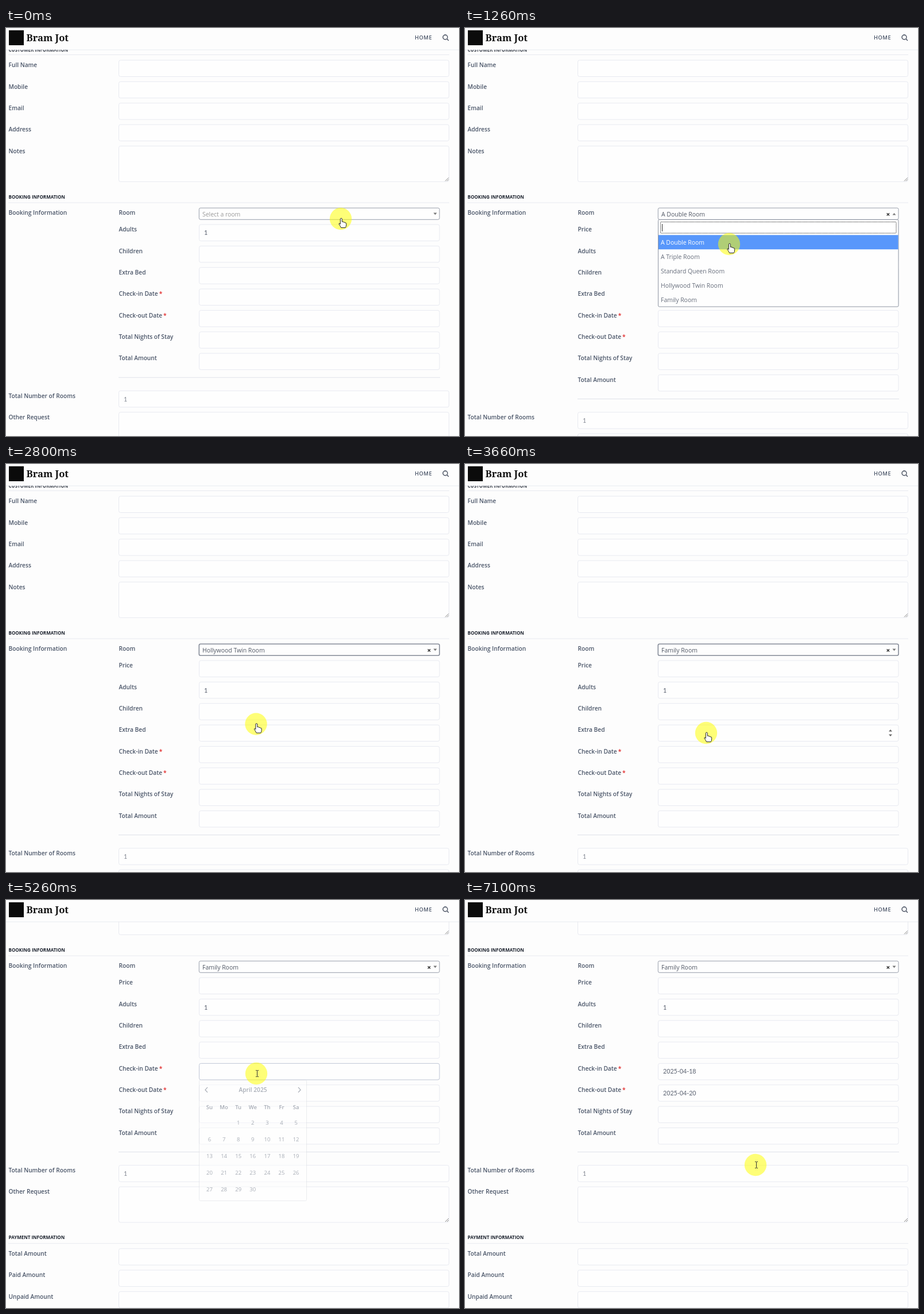
An HTML page for the animation above (7.86 s loop, 789x710 px).

```html
<!DOCTYPE html>
<html lang="en">
<head>
<meta charset="utf-8">
<title>Booking form</title>
<style>
html, body { margin: 0; width: 100%; height: 100%; overflow: hidden; background: #fdfdfd; }
svg { display: block; width: 789px; height: 710px; font-family: "Open Sans", sans-serif; }
.label { font-size: 10.2px; font-weight: 600; fill: #4a5568; }
.head { font-size: 8px; font-weight: 700; fill: #1a202c; }
.value { font-size: 10.45px; fill: #5f6675; }
.number { font: 10.7px Lato, sans-serif; fill: #5a6170; }
.field { fill: #fefefe; stroke: #e8eaf1; }
.brand { font: 700 16.6px "Noto Serif", serif; fill: #111; }
.day { font-size: 9.5px; fill: #4a5568; text-anchor: middle; }
.month { font-size: 10.2px; font-weight: 600; fill: #4a5568; text-anchor: middle; }
</style>
</head>
<body>
<svg id="stage" viewBox="0 0 789 710"></svg>
<script>
const LOOP = 7860, PITCH = 37.35, BG = '#fdfdfd';
const ROOMS = ['A Double Room', 'A Triple Room', 'Standard Queen Room', 'Hollywood Twin Room', 'Family Room'];
const stage = document.getElementById('stage');

function add(parent, tag, attrs = {}, content = '') {
  const el = document.createElementNS('http://www.w3.org/2000/svg', tag);
  for (const k in attrs) el.setAttribute(k, attrs[k]);
  el.textContent = content;
  parent.appendChild(el);
  return el;
}
const group = parent => add(parent, 'g');
const text = (p, x, y, cls, s) => add(p, 'text', { x, y, class: cls }, s);
const path = (p, d, attrs) => add(p, 'path', { d, ...attrs });
const show = (el, on) => el.setAttribute('visibility', on ? 'inherit' : 'hidden');
const move = (el, x, y) => el.setAttribute('transform', `translate(${x} ${y})`);

function field(p, x, y, w, h = 28.5) {
  return add(p, 'rect', { x, y, width: w, height: h, rx: 3, class: 'field' });
}
function line(p, x1, x2, y, color = '#e8eaf0') {
  path(p, `M${x1} ${y}H${x2}`, { stroke: color });
}
function wideRow(p, name, y, area) {
  text(p, 4.5, y + 12.2, 'label', name);
  field(p, 196.5, y, 575, area ? 62 : 28.5);
  if (area) path(p, `M765 ${y + 61}l6-6m-3 6l3-3`, { stroke: '#777', 'stroke-width': .9 });
}
function section(p, name, y, gap = 10.3) {
  text(p, 4.5, y - gap + 2.8, 'head', name);
  line(p, 4, 772, y);
}

// Form
const page = group(stage);
section(page, 'CUSTOMER INFORMATION', 46.5, 8.6);
['Full Name', 'Mobile', 'Email', 'Address', 'Notes'].forEach((n, i) =>
  wideRow(page, n, 56 + i * PITCH, n === 'Notes'));
section(page, 'BOOKING INFORMATION', 304);
text(page, 4.5, 325, 'label', 'Booking Information');
text(page, 196.5, 325, 'label', 'Room');

function innerRow(p, name, i) {
  const y = 342 + i * PITCH;
  const label = text(p, 196.5, y + 12.2, 'label', name.replace('*', ''));
  if (name.endsWith('*')) add(label, 'tspan', { dx: 2, fill: '#e02424' }, '*');
  return field(p, 336.5, y, 418.5);
}
const price = group(page), lower = group(page);
innerRow(price, 'Price', 0);
const inputs = ['Adults', 'Children', 'Extra Bed', 'Check-in Date*', 'Check-out Date*',
  'Total Nights of Stay', 'Total Amount'].map((n, i) => innerRow(lower, n, i + 1));
text(lower, 345, 397.8, 'number', '1');
const checkIn = text(lower, 345, 509.4, 'number', '2025-04-18');
const checkOut = text(lower, 345, 546.8, 'number', '2025-04-20');
const spinner = path(lower, 'M738 465.5l3-3.5 3 3.5zM738 470.5l3 3.5 3-3.5z', { fill: '#666' });
line(lower, 196, 756, 645.5, '#dfe2ea');
wideRow(lower, 'Total Number of Rooms', 668.7);
text(lower, 205, 687.3, 'number', '1').style.fill = '#868b95';
wideRow(lower, 'Other Request', 706, true);
section(lower, 'PAYMENT INFORMATION', 804.7);
['Total Amount', 'Paid Amount', 'Unpaid Amount'].forEach((n, i) => wideRow(lower, n, 813.7 + i * PITCH));

// Room select
const box = add(page, 'rect', { x: 336.3, y: 313.2, width: 418.7, height: 20.1, rx: 2.5, fill: '#fefefe' });
const chosen = text(page, 342, 328, 'value', '');
const clear = path(page, 'M734.7 322.2l4.4 4.4m0-4.4l-4.4 4.4', { stroke: '#333', 'stroke-width': 1.4 });
const chevron = path(page, '', { fill: '#777' });

const menu = group(page);
add(menu, 'rect', { x: 336.5, y: 333.5, width: 418.5, height: 151.5, rx: 2, fill: '#fefefe', stroke: '#8f96a3' });
add(menu, 'rect', { x: 340.5, y: 337.5, width: 410.5, height: 19.5, rx: 1, fill: '#fff', stroke: '#555', 'stroke-dasharray': '1.5 .7' });
const caret = path(menu, 'M343.5 341v13', { stroke: '#333' });
const options = ROOMS.map((n, i) => {
  const y = 360.3 + i * 24.9;
  return {
    bar: add(menu, 'rect', { x: 337, y, width: 417.5, height: 24.9 }),
    name: text(menu, 341, y + 16.7, 'value', n)
  };
});

// Date picker
const picker = group(page);
add(picker, 'rect', { x: 336.5, y: .5, width: 187, height: 210, rx: 2, fill: '#fff', stroke: '#d5d8df' });
text(picker, 430, 21, 'month', 'April 2025');
path(picker, 'M351 13l-4 4.5 4 4.5M509 13l4 4.5-4 4.5', { fill: 'none', stroke: '#4a5568', 'stroke-width': 1.3 });
const dayX = c => 354.5 + c * 25.1;
['Su', 'Mo', 'Tu', 'We', 'Th', 'Fr', 'Sa'].forEach((d, c) => {
  text(picker, dayX(c), 51, 'day', d).style.fontWeight = 600;
});
const hover = add(picker, 'rect', { width: 25, height: 28, fill: '#dfe9fb' });
for (let d = 1; d <= 30; d++) {
  text(picker, dayX((d + 1) % 7), 78 + 29 * Math.floor((d + 1) / 7), 'day', d);
}

// Header
add(stage, 'rect', { width: 789, height: 37.5, fill: BG });
line(stage, 0, 789, 38, '#e8ebf0');
add(stage, 'rect', { x: 5, y: 4, width: 26, height: 26, fill: '#0b0b0b' });
text(stage, 35.5, 23, 'brand', 'Bram Jot');
add(stage, 'text', { x: 712, y: 20.4, 'font-size': 9.3, 'font-weight': 600, 'letter-spacing': .5, fill: '#4a5568' }, 'HOME');
path(stage, 'M769 16a4 4 0 1 0-8 0a4 4 0 1 0 8 0M768 19l3 3', { fill: 'none', stroke: '#3d4657', 'stroke-width': 1.3 });

// Pointer
const pointer = group(stage);
add(pointer, 'circle', { r: 19.2, fill: '#ff0', opacity: .53 });
const ink = { fill: '#fff', stroke: '#222', 'stroke-width': 1, 'stroke-linejoin': 'round' };
const shapes = {
  hand: path(pointer, 'M-1.5 8.5V.6a1.5 1.5 0 0 1 3 0V5.2q2.6-.9 2.8.9q2.2-.7 2.5.9q2-.4 2 1.3v2.6q0 2.5-1.5 4.6H-.2q-.4-1.2-2.3-4.2q-2-2.6-1.2-3.2q1-.7 2.2 1.3z', ink),
  arrow: path(pointer, 'M1 0V11.5L3.7 9L5.5 13L7.3 12.2L5.5 8.3H9z', ink),
  beam: path(pointer, 'M-1-5.5h1.5q1 0 1 1v9q0 1-1 1H-1M4-5.5H2.5q-1 0-1 1v9q0 1 1 1H4', { fill: 'none', stroke: '#333', 'stroke-width': 1 })
};
move(shapes.hand, .8, 0);

// Timeline: [time, values...]
const PATH = [
  [30, 583, 332], [160, 580, 326], [270, 580, 326], [560, 520, 374], [770, 520, 374],
  [980, 492, 320], [1060, 490, 320], [1260, 460, 376], [1330, 454, 397], [1970, 454, 397],
  [2230, 446, 320], [2330, 446, 320], [2700, 435.5, 452.5], [3100, 435.5, 452.5], [3300, 428, 326],
  [3360, 428, 326], [3600, 420, 468], [4460, 420, 468], [4820, 420, 468], [5150, 436, 302],
  [5370, 436, 302], [5720, 478, 444], [5820, 478, 444], [6060, 474, 356], [6160, 472, 340],
  [6400, 472, 340], [6640, 354, 506], [6720, 354, 506], [6960, 506, 461]
];
const SCROLL = [[4430, 0], [4530, 50], [4620, 120], [4700, 172], [4780, 199], [4850, 207]];
const MENUS = [[60, 600, 0], [1030, 1760, 1], [2290, 2800, 3], [3340, 3630, 4]];
const PICKS = [[5250, 5790, 4], [6190, 6690, 5]];
const SHAPES = [[0, 'hand'], [4560, 'beam'], [5430, 'arrow'], [5560, 'hand'], [5850, 'arrow'],
  [6110, 'beam'], [6450, 'arrow'], [6520, 'hand'], [6740, 'arrow'], [7090, 'beam']];
const PRESS = 60; // a field takes focus this long before its picker opens

const smooth = u => u * u * (3 - 2 * u);
function at(keys, t, ease) {
  const i = keys.findIndex(k => k[0] > t);
  if (i === 0) return keys[0].slice(1);
  if (i < 0) return keys[keys.length - 1].slice(1);
  const a = keys[i - 1], b = keys[i], u = ease((t - a[0]) / (b[0] - a[0]));
  return a.slice(1).map((v, n) => v + (b[n + 1] - v) * u);
}

function drawSelect(t, y) {
  const open = MENUS.find(m => t >= m[0] && t < m[1]);
  const done = MENUS.filter(m => t >= m[1]).pop();
  const room = done ? done[2] : -1;
  const focus = done && !open && t < PICKS[0][0] - PRESS;
  chosen.textContent = done ? ROOMS[room] : 'Select a room';
  chosen.style.fill = done ? '#505764' : '#999';
  show(clear, done);
  chevron.setAttribute('d', open ? 'M744.5 325.5l3-3.5 3 3.5z' : 'M744.5 321.5l3 3.7 3-3.7z');
  box.setAttribute('stroke', focus ? '#858b98' : '#979daa');
  box.setAttribute('stroke-width', focus ? 1.6 : 1);
  show(price, done);
  move(lower, 0, done ? 0 : -PITCH);
  show(menu, open);
  show(caret, open && (t - open[0]) % 1100 < 565);
  const over = Math.floor((y - 360.3) / 24.9);
  const lit = over >= 0 && over < 5 ? over : Math.max(room, 0);
  options.forEach((o, i) => {
    o.bar.setAttribute('fill', i === lit ? '#5897fb' : i === room ? '#ddd' : 'none');
    o.name.style.fill = i === lit ? '#fff' : '#666d7b';
  });
}

function drawPicker(t, x, y, scroll) {
  const focused = PICKS.find(k => t >= k[0] - PRESS && t < k[1]);
  inputs.forEach((f, i) => f.style.stroke = focused && focused[2] === i + 1 ? '#c0c7d6' : '');
  const p = PICKS.find(k => t >= k[0] && t < k[1] + 100);
  show(picker, p);
  if (!p) return;
  const top = 370.5 + p[2] * PITCH;
  move(picker, 0, top);
  picker.setAttribute('opacity', Math.min(1, .4 + (t - p[0]) / 160, (p[1] + 100 - t) / 100));
  const col = Math.floor((x - 342) / 25.1), row = Math.floor((y + scroll - top - 60) / 29);
  const day = row * 7 + col - 1;
  show(hover, row >= 0 && col >= 0 && col < 7 && day > 0 && day < 31);
  hover.setAttribute('x', dayX(col) - 12.5);
  hover.setAttribute('y', 60.5 + row * 29);
}

function draw(t) {
  const [x, y] = at(PATH, t, smooth);
  const [scroll] = at(SCROLL, t, u => u);
  move(page, 0, -scroll);
  drawSelect(t, y);
  drawPicker(t, x, y, scroll);
  show(checkIn, t >= PICKS[0][1]);
  show(checkOut, t >= PICKS[1][1]);
  show(spinner, t >= 3640 && t < 4900);
  move(pointer, x, y);
  const kind = SHAPES.filter(s => t >= s[0]).pop()[1];
  for (const k in shapes) show(shapes[k], k === kind);
}

const start = performance.now();
function tick() {
  draw((performance.now() - start) % LOOP);
  requestAnimationFrame(tick);
}
tick();
</script>
</body>
</html>
```
